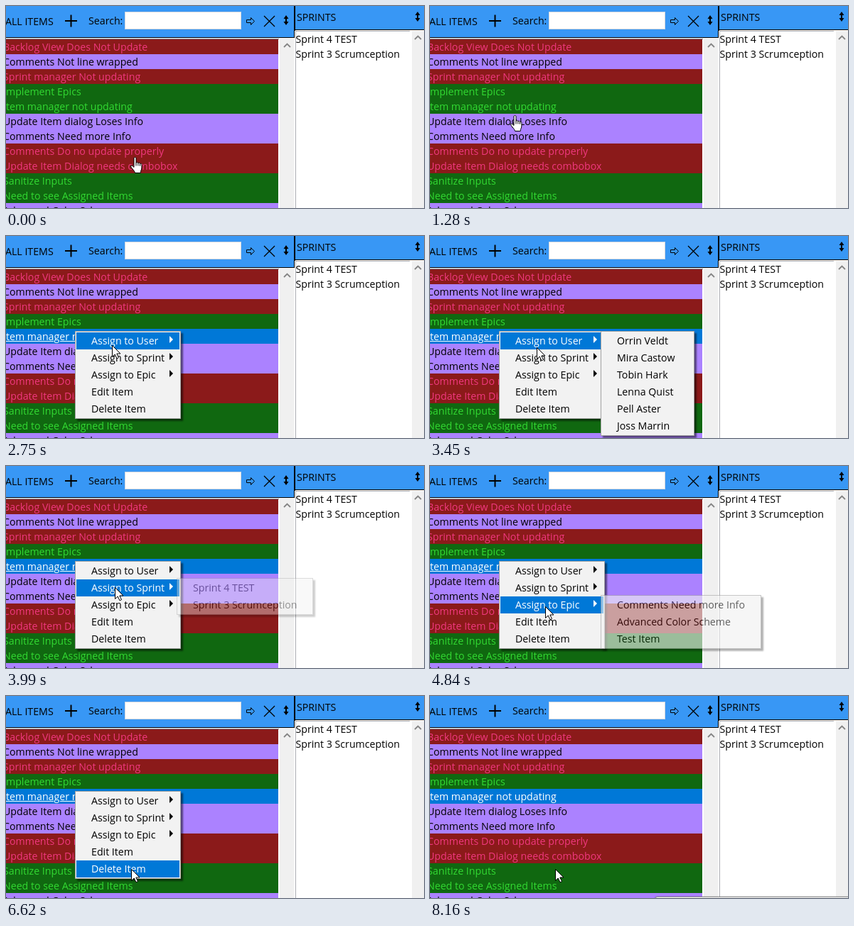
Write an HTML page that moves like this. It is 588 px wide and 285 px high and loops after 8540 ms.

```html
<!DOCTYPE html>
<html lang="en">
<head>
<meta charset="utf-8">
<title>Backlog context menu</title>
<style>
html, body { margin: 0; width: 100%; height: 100%; overflow: hidden; background: #fff; }
#stage { position: relative; width: 588px; height: 285px; overflow: hidden; background: #fff;
  font: 14.2px/21px "Open Sans", "Noto Sans", sans-serif; color: #000; cursor: default; }
#stage div, #stage svg { position: absolute; box-sizing: border-box; }
#list, #menus { left: 0; top: 0; width: 588px; height: 285px; }
.bar { background: #3897f5; border-bottom: 1px solid #000; }
.label, .row, .item { white-space: pre; }
.row { left: 0; width: 383px; height: 21px; text-indent: -4px; overflow: hidden; }
.red { background: #8b1a1a; color: #f0387f; }
.green { background: #106810; color: #32d932; }
.purple { background: #ab82ff; }
.row.picked { background: #0078d7; color: #fff; }
.hover span { text-decoration: underline; text-underline-offset: 1px; text-decoration-thickness: 1px; }
.track { background: #f0f0f0; }
.menu { background: #f2f2f2; border: 1px solid #a3a3a3; box-shadow: 3px 3px 2px rgba(0, 0, 0, .5); }
.item { left: 1px; right: 1px; height: 24px; line-height: 24px; padding-left: 21px; }
.item.hot { background: #0078d7; color: #fff; }
.parent::after { content: ""; position: absolute; right: 9px; top: 5px;
  border: 5px solid transparent; border-left-color: currentColor; border-right: 0; }
#stage #ghost { left: 99px; top: 232px; width: 145px; }
#dialog { left: 316px; top: 283px; width: 290px; height: 40px; background: #fff;
  border: 1px solid #8a8a8a; border-radius: 4px; box-shadow: 0 0 2px rgba(0, 0, 0, .35); }
</style>
</head>
<body>
<div id="stage">
  <div class="bar" style="left:0;top:0;width:406px;height:45px;border-right:1px solid #000"></div>
  <div class="bar" style="left:407px;top:0;width:181px;height:34px"></div>
  <div class="label" style="left:-1px;top:11px">ALL ITEMS</div>
  <div class="label" style="left:116px;top:10px">Search:</div>
  <div class="label" style="left:409px;top:5px">SPRINTS</div>
  <div style="left:167px;top:8px;width:164px;height:25px;background:#fff;border:1px solid #d0d6de"></div>
  <div style="left:0;top:46px;width:384px;height:1px;background:#828790"></div>
  <div style="left:406px;top:0;width:1px;height:35px;background:#000"></div>
  <div style="left:407px;top:35px;width:161px;height:250px;border:solid #abadb3;border-width:1px 0 0 1px"></div>
  <div class="track" style="left:385px;top:46px;width:20px;height:239px"></div>
  <div class="track" style="left:571px;top:35px;width:17px;height:250px"></div>
  <div class="label" style="left:407.5px;top:36px">Sprint 4 TEST
Sprint 3 Scrumception</div>
  <svg width="588" height="70" style="left:0;top:0" fill="none" stroke="#000">
    <path d="M83 21h17M91.500 12.500v17" stroke-width="2"/>
    <path d="M338.5 19.5h6v-3l5 5-5 5v-3h-6z"/>
    <path d="M363 14l15 15M378 14l-15 15" stroke-width="1.3"/>
    <g fill="#000" stroke="none">
      <path id="sort" d="M394 13l3.500 5h-2.500v4h2.500l-3.500 5-3.500-5h2.500v-4h-2.500z"/>
      <use href="#sort" x="185" y="-5"/>
    </g>
    <path d="M391 58l4.500-4.500 4.500 4.500M575 47l4.500-4.500 4.500 4.500" stroke="#858585" stroke-width="1.8"/>
  </svg>
  <div id="list"></div>
  <div id="menus"></div>
  <div id="ghost" class="item hot">Delete Item</div>
  <div id="dialog"></div>
  <svg id="cursor" width="22" height="26" overflow="visible" style="left:0;top:0" fill="#fff" stroke="#000">
    <path id="arrow" d="M.5 .5V16.500L4.200 13l2.800 5.800 2.500-1.200-2.700-5.600H12z"/>
    <g id="hand" transform="translate(-7 0)">
      <path d="M6 2c0-2 3-2 3 0v6.500c.3-1.200 2.700-1.100 2.900.3.500-.9 2.400-.6 2.600.7.800-.7 2.400-.2 2.400 1.200v4.300c0 3-1.700 4.500-1.700 7.500H7.500c0-2.500-4.700-6.300-5.700-8.500-.8-1.800 1-2.700 2.200-1.400L6 14.500z"/>
      <path d="M9 8.500v4M11.900 9v3.500M14.500 9.700v3"/>
    </g>
  </svg>
</div>
<script>
const LOOP = 8540, OPEN = 2060, CLOSE = 7930;
const $ = id => document.getElementById(id);

function add(parent, className, html = "", style = {}) {
  const el = document.createElement("div");
  el.className = className;
  el.innerHTML = html;
  Object.assign(el.style, style);
  return parent.appendChild(el);
}

const rows = [
  ["red", "Backlog View Does Not Update"],
  ["purple", "Comments Not line wrapped"],
  ["red", "Sprint manager Not updating"],
  ["green", "Implement Epics"],
  ["green", "Item manager not updating"],
  ["purple", "Update Item dialog Loses Info"],
  ["purple", "Comments Need more Info"],
  ["red", "Comments Do no update properly"],
  ["red", "Update Item Dialog needs combobox"],
  ["green", "Sanitize Inputs"],
  ["green", "Need to see Assigned Items"],
  ["purple", "Advanced Color Scheme"]
].map(([color, text], i) =>
  add($("list"), "row " + color, `<span>${text}</span>`, { top: 47 + 21 * i + "px" }));

function makeMenu(left, top, width, labels, parents = 0) {
  const menu = add($("menus"), "menu", "", {
    left: left + "px", top: top + "px", width: width + "px", height: labels.length * 24 + 4 + "px"
  });
  labels.forEach((text, i) =>
    add(menu, i < parents ? "item parent" : "item", text, { top: 1 + 24 * i + "px" }));
  return menu;
}

const mainMenu = makeMenu(97, 134, 149,
  ["Assign to User", "Assign to Sprint", "Assign to Epic", "Edit Item", "Delete Item"], 3);
const userMenu = makeMenu(240, 134, 132,
  ["Orrin Veldt", "Mira Castow", "Tobin Hark", "Lenna Quist", "Pell Aster", "Joss Marrin"]);
const sprintMenu = makeMenu(240, 158, 192, ["Sprint 4 TEST", "Sprint 3 Scrumception"]);
const epicMenu = makeMenu(240, 182, 226,
  ["Comments Need more Info", "Advanced Color Scheme", "Test Item"]);

// Pointer moves: start, end, number of steps, destination x and y
const moves = [
  [740, 740, 1, 180, 213],
  [1050, 1430, 6, 97, 133],
  [2520, 2750, 4, 149, 154],
  [3450, 3680, 4, 153, 171],
  [4310, 4460, 3, 162, 198],
  [5230, 5380, 3, 165, 217],
  [6070, 6230, 3, 169, 231],
  [6460, 6620, 3, 176, 244]
];

// Stepped progress from 0 to 1; the first step lands at start, the last at end
function progress(t, start, end, n) {
  if (t < start) return 0;
  if (t >= end) return 1;
  return (Math.floor((t - start) * (n - 1) / (end - start) + .1) + 1) / n;
}

function pointer(t) {
  let x = 181, y = 213;
  for (const [start, end, n, toX, toY] of moves) {
    const p = progress(t, start, end, n), k = p * p * (3 - 2 * p);
    x += (toX - x) * k;
    y += (toY - y) * k;
  }
  return [Math.round(x), Math.round(y)];
}

function fade(menu, t, start, end, n, close) {
  const p = t < close ? progress(t, start, end, n) : 0;
  menu.style.opacity = p > 0 && p < 1 ? .15 + .7 * p : p;
}

const show = (el, on) => el.style.display = on ? "" : "none";

function draw(now) {
  const t = now % LOOP, [x, y] = pointer(t), opened = t >= OPEN;

  rows[4].classList.toggle("picked", opened);
  rows[4].classList.toggle("hover", opened && t < CLOSE);

  fade(mainMenu, t, OPEN, 2290, 4, CLOSE);
  fade(userMenu, t, 3070, 3140, 2, 3990);
  fade(sprintMenu, t, 3990, 4160, 3, 4770);
  fade(epicMenu, t, 4770, 4920, 3, 5690);
  if (t >= 5690 && t < 5770) epicMenu.style.opacity = .5;

  const active = Math.floor((y - 136) / 24);
  [...mainMenu.children].forEach((item, i) => item.classList.toggle("hot", i === active));

  $("ghost").style.opacity = t < CLOSE ? 0 : 1 - progress(t, CLOSE, 8160, 4);
  show($("dialog"), t >= 8160);

  $("cursor").style.transform = `translate(${x}px, ${y}px)`;
  show($("hand"), !opened);
  show($("arrow"), opened);
  requestAnimationFrame(draw);
}
draw(performance.now());
</script>
</body>
</html>
```
